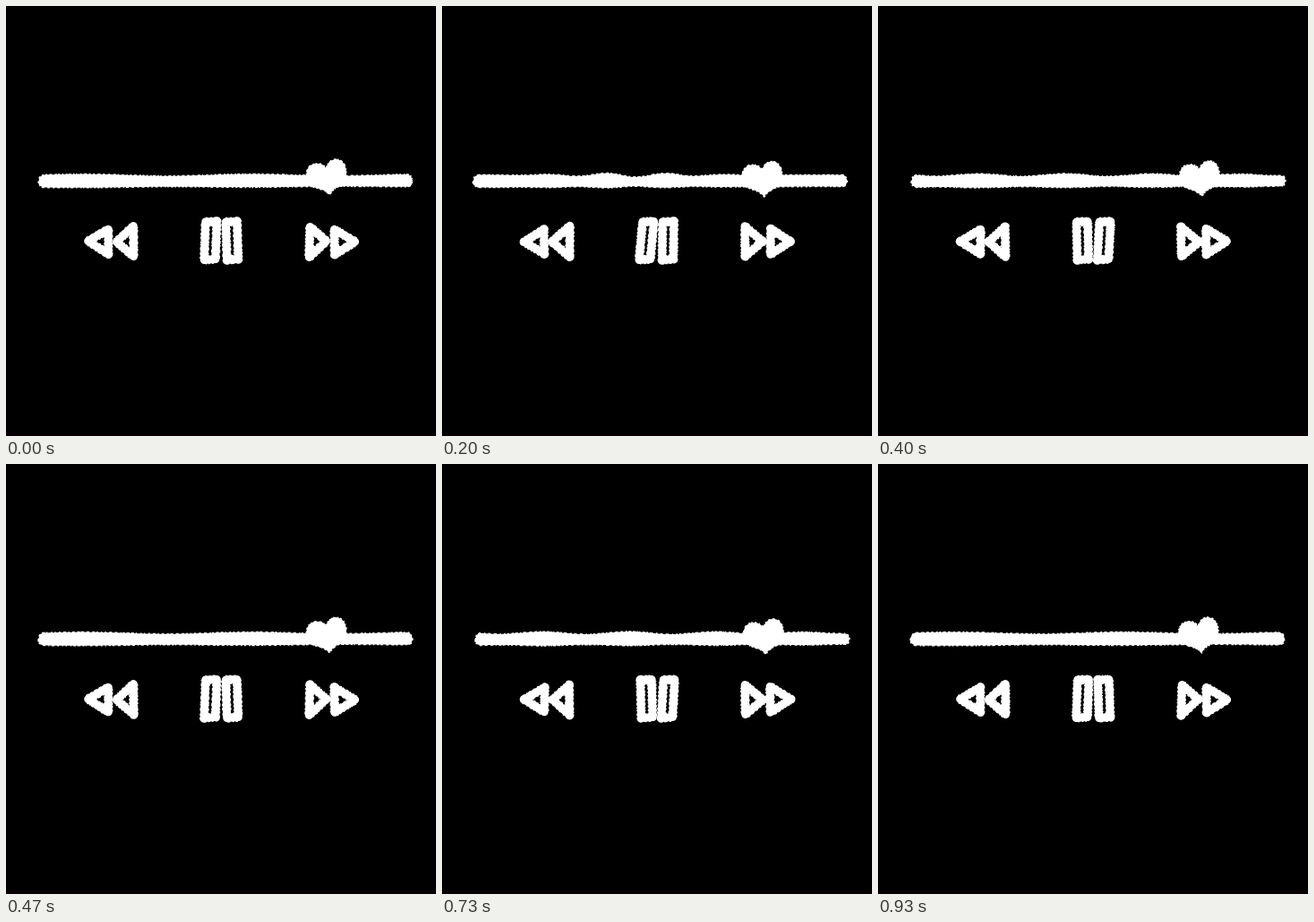
Recreate the animation shown at these times as an HTML page. Size 480 px wide and 480 px high, loop 990 ms.

```html
<!DOCTYPE html>
<html lang="en">
<head>
<meta charset="utf-8">
<title>Hand-drawn player</title>
<style>
  html, body { margin: 0; width: 100%; height: 100%; overflow: hidden; background: #000; }
  svg { display: block; width: 100vw; height: 100vh; }
  path { stroke-linejoin: round; }
  .solid { fill: #fff; }
  .line, .fuzz { fill: none; stroke: #fff; }
  .line { stroke-width: 9; }
  .solid + .fuzz { stroke-width: 1.6; }
  .line + .fuzz { stroke-width: 10.3; }
</style>
</head>
<body>
<svg id="stage" viewBox="0 0 480 480">
  <rect width="480" height="480" fill="#000"/>
  <rect y="477" width="480" height="3" fill="#080004"/>
</svg>
<script>
const LOOP = 990, STEPS = 15, CYCLES = 7;
const MIRROR = 481;
const stage = document.getElementById('stage');

// Three drawings: the ripple of the bar, the place of the heart, the lean of the pause bars.
const POSES = [
  { wave: 190, crest: 85, height: 1.1, spread: 400, left: 36, heart: [0, -1, -4], lean: [0.8, -0.7] },
  { wave: 67, crest: 183, height: 2.3, spread: 85, left: 34.5, heart: [-0.5, 1, -1], lean: [2, 0.3] },
  { wave: 97, crest: 112, height: 1.5, spread: 300, left: 37, heart: [1, 0.5, -2], lean: [-0.5, 1.2] }
];
const HEART = 'M358 182C360 175 366 172 371 173C380 175 382 186 379 196' +
  'C376 204 366 202 360 212C352 202 340 205 337 196C333 186 338 176 347 176C352 176 356 178 358 182Z';

function seeded(seed) {
  let s = seed * 7919 + 17;
  return () => (s = s * 16807 % 2147483647) / 2147483647;
}

function makeShape(kind) {
  return [kind, 'fuzz'].map(name => {
    const el = document.createElementNS('http://www.w3.org/2000/svg', 'path');
    el.setAttribute('class', name);
    return stage.appendChild(el);
  });
}

const bar = makeShape('solid');
const heart = makeShape('solid');
const arrows = Array.from({ length: 4 }, () => makeShape('line'));
const pauses = Array.from({ length: 2 }, () => makeShape('line'));

const polygon = pts => 'M' + pts.join(' ') + 'Z';

function barPath({ wave, crest, height, spread, left }) {
  const right = left + 418;
  const upper = [], lower = [];
  for (let x = left + 5; x <= right - 5; x += 4) {
    const fade = Math.exp(-(((x - 210) / spread) ** 2));
    const lift = height * fade * Math.cos(2 * Math.PI * (x - crest) / wave);
    upper.push(x, 188.6 - lift);
    lower.unshift(x, 202.6 - x / 400 + lift * 0.4);
  }
  return polygon([left, 197, left + 1.5, 191, ...upper,
    right - 2, 190, right, 195, right - 1.5, 200, ...lower, left + 1, 200]);
}

// An arrow head pointing left, or right when flipped.
function arrowPath(tip, base, half, flip, random) {
  const wobble = () => (random() - 0.5) * 1.4;
  const place = (x, y) => [(flip ? MIRROR - x : x) + wobble(), y + wobble()];
  return polygon([...place(tip, 263), ...place(base, 263 - half), ...place(base, 263 + half)]);
}

function pausePath(x, lean) {
  return polygon([x - 6.3 + lean, 241, x + 6.3 + lean, 240.5,
    x + 6.3 - lean, 282.5, x - 6.3 - lean, 283.5]);
}

function bristles(random) {
  return Array.from({ length: 40 }, () => 1 + random() * 2.6).join(' ');
}

function draw(shape, d, random) {
  for (const el of shape) el.setAttribute('d', d);
  shape[1].setAttribute('stroke-dasharray', bristles(random));
}

let shown = -1;
function render(time) {
  const t = time % LOOP;
  let step = STEPS - 1;
  while (Math.round(step * 20 / 3) * 10 > t) step--;
  if (step === shown) return;
  shown = step;

  const index = Math.floor(step * CYCLES * 3 / 49 + 0.4) % 3;
  const pose = POSES[index];
  const fuzz = seeded(step + 1), shape = seeded(index + 40);

  draw(bar, barPath(pose), fuzz);

  const [dx, dy, turn] = pose.heart;
  draw(heart, HEART, fuzz);
  for (const el of heart) el.setAttribute('transform', `translate(${dx} ${dy}) rotate(${turn} 358 192)`);

  arrows.forEach((el, i) => {
    const flip = i > 1;
    const d = i % 2 ? arrowPath(123.2, 142.3, 17, flip, shape) : arrowPath(91.7, 114.4, 14.2, flip, shape);
    draw(el, d, fuzz);
  });
  pauses.forEach((el, i) => draw(el, pausePath(228.3 + i * 24, pose.lean[i]), fuzz));
}

const start = performance.now();
function tick() {
  render(performance.now() - start);
  requestAnimationFrame(tick);
}
render(0);
requestAnimationFrame(tick);
</script>
</body>
</html>
```
